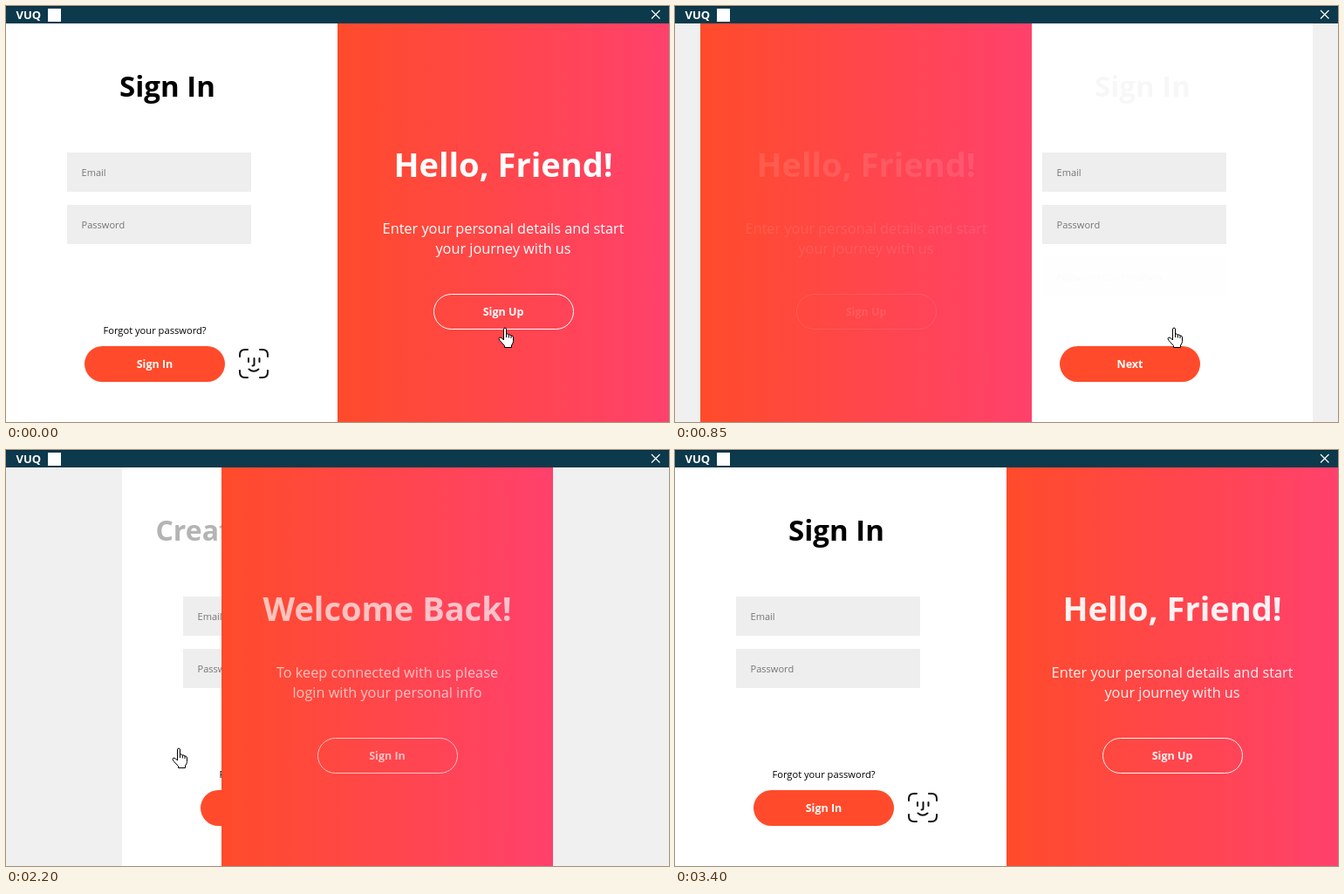
An HTML page for the animation above (3.45 s loop, 760 by 477 pixels).

```html
<!DOCTYPE html>
<html lang="en">
<head>
<meta charset="utf-8">
<title>Sign in</title>
<style>
  html, body { margin: 0; width: 100%; height: 100%; overflow: hidden; background: #f0f0f0; }
  svg { display: block; width: 760px; height: 477px; font-family: "Open Sans", sans-serif; }
  .bold { font-weight: 700; }
  .mid { text-anchor: middle; }
  .field { fill: #eee; }
  .hint { font-size: 11.05px; fill: #757575; }
  .label { font: 700 12.5px "Open Sans", sans-serif; fill: #fff; text-anchor: middle; }
  .line { fill: none; stroke: #111; stroke-width: 2; stroke-linecap: round; }
</style>
</head>
<body>
<svg viewBox="0 0 760 477">
  <defs>
    <linearGradient id="glow">
      <stop offset="0" stop-color="#ff4b2b"/>
      <stop offset="1" stop-color="#ff416c"/>
    </linearGradient>
  </defs>
  <rect width="760" height="477" fill="#f0f0f0"/>

  <g id="form">
    <rect y="20" width="380" height="457" fill="#fff"/>
    <text id="title" class="bold mid" x="185" y="104"></text>
    <rect class="field" x="70" y="168" width="211" height="45"/>
    <text class="hint" x="86.5" y="195">Email</text>
    <rect class="field" x="70" y="228" width="211" height="45"/>
    <text class="hint" x="86.5" y="255">Password</text>
    <g id="confirm">
      <rect class="field" x="70" y="288" width="211" height="45"/>
      <text class="hint" x="86.5" y="315">Password Confirmation</text>
    </g>
    <rect x="90" y="390" width="161" height="41" rx="20.5" fill="#ff4b2b"/>
    <text id="submit" class="label" x="170.5" y="415"></text>
    <g id="extras">
      <text class="mid" x="170.5" y="376" font-size="11.15">Forgot your password?</text>
      <path class="line" d="M268 402V400Q268 394 274 394H277M291 394H294Q300 394 300 400V402M300 418V420Q300 426 294 426H291M277 426H274Q268 426 268 420V418M278 404V408M290.500 404V408M284.500 404V411Q284.500 412.500 282.500 412.500M278.500 416.500Q284 421 289.500 416.500"/>
    </g>
  </g>

  <g id="panel">
    <rect y="20" width="380" height="457" fill="url(#glow)"/>
    <g id="message" fill="#fff">
      <text id="greet" class="bold mid" x="190" y="196" font-size="38"></text>
      <text id="row1" class="mid" x="190" y="261" font-size="16.3"></text>
      <text id="row2" class="mid" x="190" y="284" font-size="16.3"></text>
      <rect x="110.500" y="330.500" width="160" height="40" rx="20" fill="none" stroke="#fff"/>
      <text id="toggle" class="label" x="190" y="355"></text>
    </g>
  </g>

  <rect width="760" height="20" fill="#0c394b"/>
  <rect width="760" height="1" fill="#0a2c3b"/>
  <text class="bold" x="11.500" y="15" font-size="13" fill="#fff">VUQ</text>
  <rect x="48" y="3" width="15" height="15" fill="#fff"/>
  <path d="M740 5L749.500 14.500M749.500 5L740 14.500" stroke="#fff" stroke-width="1.2"/>

  <g id="cursor" fill="#fff" stroke="#000" stroke-linejoin="round">
    <path d="M6.500 14V3Q6.500 1 8 1T9.500 3V8Q11.500 7.300 12.300 9Q14.300 8.300 15 10Q17.300 9.500 17.500 12V16.500Q17.300 19 15.500 21V23.500H7.500V21.500L2 15.500Q.3 13.200 1.500 12.300Q3 11.500 4.500 13L6.500 15Z"/>
    <path d="M9.500 8V12M12.300 9V12.500M15 10V13" fill="none"/>
  </g>
</svg>
<script>
const LOOP = 3450, STEP = 50, WIDTH = 380;
const el = id => document.getElementById(id);
const clamp = x => Math.max(0, Math.min(1, x));

const signIn = {
  title: "Sign In", size: 33, greet: "Hello, Friend!", toggle: "Sign Up",
  row1: "Enter your personal details and start", row2: "your journey with us"
};
const create = {
  title: "Create an Account", size: 32, greet: "Welcome Back!", toggle: "Sign In",
  row1: "To keep connected with us please", row2: "login with your personal info"
};
// Each slide: start time, decay rate per ms, delay of the move
const forward = { start: 470, rate: 0.007, delay: 15, from: signIn, to: create };
const back = { start: 2060, rate: 0.0084, delay: 15.4, from: create, to: signIn };

function setText(id, text) {
  const node = el(id);
  if (node.textContent !== text) node.textContent = text;
}
function place(id, x, y = 0) {
  el(id).setAttribute("transform", `translate(${x} ${y})`);
}
function fade(id, value) {
  el(id).setAttribute("opacity", value);
}

function titleAlpha(u) {
  const decay = from => Math.exp(-0.0097 * Math.max(0, u - from));
  return u < 419 ? decay(13) : 1 - decay(419);
}
function messageAlpha(u) {
  return u < 945 ? 1 - clamp(u / 425) : clamp((u - 945) / 425);
}

function draw(t) {
  const slide = t < 2000 ? forward : back;
  const u = t < 500 ? 0 : Math.max(0, t - slide.start);
  const left = Math.floor(WIDTH * Math.exp(-slide.rate * Math.max(0, u - slide.delay)));
  const shift = u === 0 ? (slide === forward ? 0 : WIDTH)
    : slide === forward ? WIDTH - left : left;
  place("form", shift);
  place("panel", WIDTH - shift);

  const heading = u < 419 ? slide.from : slide.to;
  setText("title", heading.title);
  el("title").setAttribute("font-size", heading.size);
  fade("title", titleAlpha(u));

  const message = u < 945 ? slide.from : slide.to;
  for (const id of ["greet", "row1", "row2", "toggle"]) setText(id, message[id]);
  fade("message", messageAlpha(u));

  const creating = t >= 500 && t < 2000;
  setText("submit", creating ? "Next" : "Sign In");
  fade("extras", creating ? 0 : 1);
  fade("confirm", creating ? titleAlpha(u) : 0);

  const p = clamp((t - 1500) / 450), glide = p * p * (3 - 2 * p);
  place("cursor", 564 - 374 * glide, 368 - 27 * glide);
  fade("cursor", t < 2250 ? 1 : 0);
}

const begin = performance.now();
function tick() {
  const t = (performance.now() - begin) % LOOP;
  draw(Math.floor(t / STEP) * STEP);
  requestAnimationFrame(tick);
}
draw(0);
requestAnimationFrame(tick);
</script>
</body>
</html>
```
